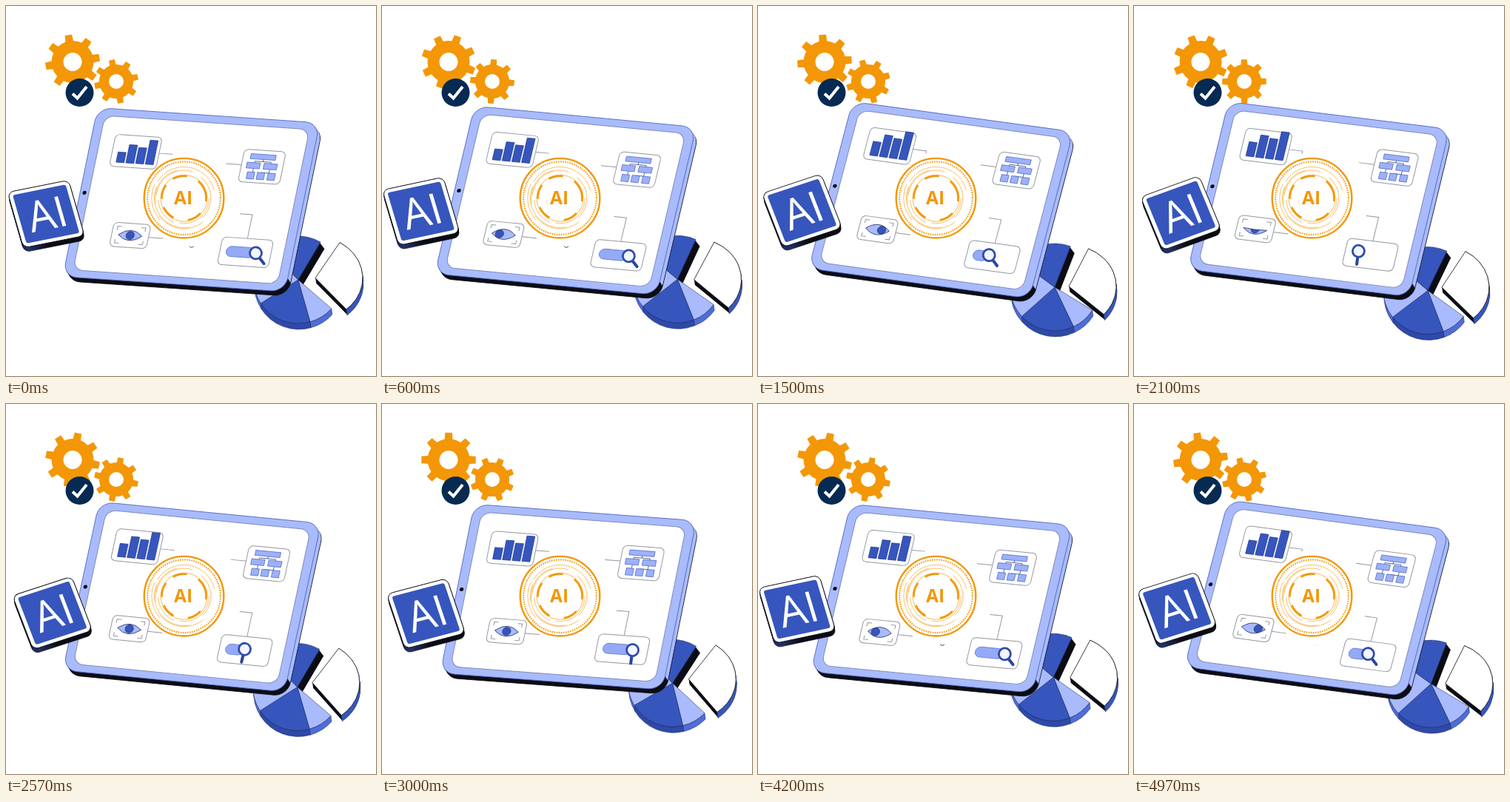
An HTML page with a canvas for the animation above (5010 ms loop, 500 by 500 pixels).

```html
<!DOCTYPE html>
<html lang="en">
<head>
<meta charset="utf-8">
<title>AI tablet</title>
<style>
  html, body { margin: 0; width: 100%; height: 100%; overflow: hidden; background: #fff; }
  canvas { display: block; width: 500px; height: 500px; }
</style>
</head>
<body>
<canvas id="stage"></canvas>
<script>
const canvas = document.getElementById('stage');
const ctx = canvas.getContext('2d');
const ratio = window.devicePixelRatio || 1;
canvas.width = canvas.height = 500 * ratio;

const LOOP = 5010, STEP = 100 / 3, SWAY = 3600;
const RAD = Math.PI / 180, TURN = 2 * Math.PI;
const BLUE = '#3656bd', LIGHT = '#a9bbfc', INK = '#0c0d14', EDGE = '#26346f';
const ORANGE = '#f39707', NAVY = '#062a52', GRAY = '#9498a3';

let now = 0;

// Every floating part swings around a mean and is highest at its peak time.
const wave = (mean, swing, peak) => mean + swing * Math.cos((now - peak) / SWAY * TURN);
const clamp = v => Math.max(0, Math.min(1, v));
const smooth = (from, to, t) => {
  const s = clamp((t - from) / (to - from));
  return s * s * (3 - 2 * s);
};
const bump = (t, mid, width, power) => Math.exp(-(((t - mid) / width) ** power));

// Matrix for a plane whose top edge dips by `dip` and whose side leans by `lean` degrees.
const plane = (dip, lean) =>
  [Math.cos(dip * RAD), Math.sin(dip * RAD), -Math.sin(lean * RAD), Math.cos(lean * RAD)];

function within(x, y, basis, draw) {
  ctx.save();
  ctx.transform(...basis, x, y);
  draw();
  ctx.restore();
}

function paint(fill, stroke, width = 1) {
  if (fill) { ctx.fillStyle = fill; ctx.fill(); }
  if (stroke) { ctx.strokeStyle = stroke; ctx.lineWidth = width; ctx.stroke(); }
}

function box(x, y, w, h, r, fill, stroke, width) {
  ctx.beginPath();
  ctx.roundRect(x, y, w, h, r);
  paint(fill, stroke, width);
}

function disc(x, y, r, fill, stroke, width) {
  ctx.beginPath();
  ctx.arc(x, y, r, 0, TURN);
  paint(fill, stroke, width);
}

function line(points, color, width = 1) {
  ctx.beginPath();
  points.forEach(([x, y]) => ctx.lineTo(x, y));
  paint(null, color, width);
}

function label(text, x, y, size, weight, color) {
  ctx.font = `${weight} ${size}px "Open Sans", "Noto Sans", sans-serif`;
  ctx.textAlign = 'center';
  ctx.fillStyle = color;
  ctx.fillText(text, x, y);
}

// Stacks copies from the bottom up to give a shape some depth.
function thick(depth, dx, draw) {
  for (let k = depth; k > 0; k--) {
    ctx.save();
    ctx.translate(dx * k / depth, k);
    draw(k === depth);
    ctx.restore();
  }
}

function gear(x, y, size, turn, hole) {
  const teeth = 8;
  ctx.beginPath();
  for (let i = 0; i < teeth; i++) {
    const mid = turn * RAD + i * TURN / teeth;
    [[0.77, -0.19], [1, -0.13], [1, 0.13], [0.77, 0.19]].forEach(([r, a]) =>
      ctx.lineTo(x + size * r * Math.cos(mid + a), y + size * r * Math.sin(mid + a)));
    ctx.arc(x, y, size * 0.77, mid + 0.19, mid + TURN / teeth - 0.19);
  }
  ctx.closePath();
  paint(ORANGE);
  disc(x, y, hole, '#fff');
}

function gears() {
  const spin = 135 * now / LOOP;
  gear(90, 75.5, 37, -9 - spin, 12.5);
  gear(149, 102, 30, spin - 12, 10);
  disc(99.5, 117, 19, NAVY);
  line([[90, 118.5], [96.5, 124.5], [109, 109]], '#fff', 4);
}

function sector(x, y, rx, ry, from, to) {
  ctx.beginPath();
  ctx.moveTo(x, y);
  ctx.ellipse(x, y, rx, ry, 0, from * RAD, to * RAD);
  ctx.closePath();
}

function rim(x, y, rx, ry, from, to, depth, fill) {
  ctx.beginPath();
  ctx.ellipse(x, y, rx, ry, 0, from * RAD, to * RAD);
  ctx.ellipse(x + 1, y + depth, rx, ry, 0, to * RAD, from * RAD, true);
  ctx.closePath();
  paint(fill, EDGE, 0.6);
}

function pie() {
  const x = wave(397, 4.5, 1200), y = wave(376.5, 8, 2150), turn = wave(-2.5, 6, 3100);
  const cuts = [40, 73, 146, 225, 299].map(a => a + turn);
  thick(8, 6, () => { sector(x, y, 59, 58, cuts[3], cuts[4]); paint(INK); });
  thick(8, 1, () => { sector(x, y, 59, 58, cuts[0], cuts[3]); paint(INK); });
  for (let i = 0; i < 3; i++) {
    rim(x, y, 60, 59, cuts[i], Math.min(cuts[i + 1], 185), 8, i === 1 ? '#2e49a8' : '#4f6dd6');
  }
  for (let i = 0; i < 4; i++) {
    sector(x, y, 60, 59, cuts[i], cuts[i + 1]);
    paint(i % 2 ? BLUE : LIGHT, EDGE, 0.6);
  }
}

function wedge() {
  const x = wave(418, 4.2, 900), y = wave(374, 6.5, 1900);
  const from = wave(-61, 6, 2900), to = from + 108;
  thick(7, 1, () => { sector(x, y, 64, 56, from, to); paint(INK); });
  rim(x, y, 64, 56, from, to, 8, BLUE);
  sector(x, y, 64, 56, from, to);
  paint('#fff', INK, 0.8);
}

function tablet(basis) {
  const x = wave(135.5, 1.8, 1800), y = wave(144, 4, 0);
  const shell = (fill, stroke) => box(-12, -10, 301, 233, 19, fill, stroke, 0.8);
  const side = ctx.createLinearGradient(0, 0, 0, 213);
  side.addColorStop(0, LIGHT);
  side.addColorStop(0.955, LIGHT);
  side.addColorStop(0.96, INK);
  thick(6, 4, lowest => within(x, y, basis, () => shell(side, lowest && INK)));
  within(x, y, basis, () => {
    shell(LIGHT, '#4a5fb5');
    box(0, 0, 277, 213, 13, '#fff', '#7f8cb8', 1);
    disc(-6, 107, 2.6, INK);
  });
}

function card(w, h) {
  box(-w / 2, -h / 2, w, h, 6, '#fff', GRAY, 1);
}

function chart(basis) {
  const tick = Math.max(0, wave(0, 4.2, 1800)), grow = wave(0, 3, 1900);
  within(wave(176.9, 1.5, 1800), wave(193, 4, -100), basis, () => {
    card(63, 44);
    line([[32, 0], [50, 0], [50, tick]], GRAY);
    [17, 28, 25, 36].forEach((h, i) =>
      box(-23.5 + i * 13.2, 16 - h - grow, 10.8, h + grow, 0, BLUE, '#22398f', 0.7));
  });
}

function flow(basis) {
  within(wave(348.5, 4, 2300), wave(219, 4, 1150), basis, () => {
    card(56, 45);
    line([[-28, -1], [-49, -1]], GRAY);
    line([[0, -12], [0, -7], [-11, -7], [-11, 13]], EDGE, 0.7);
    line([[0, -7], [11, -7], [11, 10], [15, 10], [15, 15]], EDGE, 0.7);
    line([[11, 8], [0, 8], [0, 13]], EDGE, 0.7);
    const part = (x, y, w, h) => box(x, y, w, h, 0, '#9db1fa', '#4964bd', 0.7);
    part(-18, -17, 34, 7);
    [-21, 2].forEach(x => part(x, -5, 18, 8));
    [-18, -4.5, 10].forEach(x => part(x, 8, 10, 9.5));
  });
}

function eye(basis) {
  const t = now % SWAY;
  const look = t < SWAY / 2 ? -6.5 * Math.sin(t / SWAY * 2 * TURN) : 0;
  const lid = 1 - 1.1 * bump(t, 2100, 280, 2);
  const almond = () => {
    ctx.beginPath();
    ctx.moveTo(-16, 0);
    ctx.quadraticCurveTo(0, -14 * lid, 16, 0);
    ctx.quadraticCurveTo(0, 14, -16, 0);
  };
  within(wave(165, 3.6, 3200), wave(305.6, 4.5, 100), basis, () => {
    card(50, 33);
    line([[25, 1], [45, 1]], GRAY);
    [-1, 1].forEach(sx => [-1, 1].forEach(sy =>
      line([[sx * 13, sy * 11.5], [sx * 19, sy * 11.5], [sx * 19, sy * 6.5]], GRAY)));
    ctx.save();
    almond();
    paint(LIGHT);
    ctx.clip();
    disc(look, 0, 5.5, BLUE, EDGE, 0.8);
    ctx.restore();
    almond();
    paint(null, EDGE, 0.8);
  });
}

function search(basis) {
  const t = now % SWAY;
  const x = wave(320.5, 4.2, 3150), y = wave(335.5, 4, 1300);
  const slide = smooth(700, 2100, t) - smooth(2100, 3000, t);
  const lx = 14 - 30 * slide, ly = 1 - 6 * slide;
  const tilt = (52 + 52 * bump(t, 2550, 750, 4)) * RAD;
  within(x, y, basis, () => {
    card(69, 38);
    line([[-1, -19], [-1, -52], [-18, -52]], GRAY);
    if (lx > -14) box(-26, -7, lx + 24, 14, 7, '#94aaf6', '#5f79cf', 0.8);
  });
  within(x + lx, y + ly, [Math.cos(tilt), Math.sin(tilt), -Math.sin(tilt), Math.cos(tilt)], () => {
    ctx.lineCap = 'round';
    line([[9, 0], [18, 0]], '#2b459f', 4);
    ctx.lineCap = 'butt';
    disc(0, 0, 8, '#f3f6ff', '#2f4bab', 2.8);
  });
}

function mark() {
  ctx.globalAlpha = clamp(wave(0.2, 0.9, 400));
  within(wave(249, 2, 3300), 325.5, [1, 0, 0, 1], () =>
    line([[-3, -0.8], [0, 1], [3, -0.8]], '#777c88', 1.2));
  ctx.globalAlpha = 1;
}

function badge() {
  let seed = 11;
  const random = () => (seed = seed * 16807 % 2147483647) / 2147483647;
  const arc = (r, from, sweep, width) => {
    ctx.beginPath();
    ctx.arc(0, 0, r, from * RAD, (from + sweep) * RAD);
    paint(null, ORANGE, width);
  };
  within(240.5, 259.7, [1, 0, 0, 1], () => {
    disc(0, 0, 55, '#fff');
    arc(53.8, 0, 360, 2.4);
    ctx.setLineDash([1.6, 1.5]);
    arc(49.3, 0, 360, 2);
    ctx.setLineDash([]);
    for (let r = 34; r < 44; r += 1.2) arc(r, random() * 360, 60 + random() * 90, 0.6);
    arc(31.5, 0, 360, 0.7);
    [-50, 42, 118, 178, 240].forEach((from, i) => arc(30, from, i ? 38 : 58, 2.6));
    label('AI', -1, 8.5, 24.5, 700, ORANGE);
  });
}

function tile() {
  const x = wave(58, 5.5, 2250), y = wave(279.5, 3.7, 2950), turn = wave(15.5, 4.5, 2000);
  const basis = plane(-turn, -(7.5 + 0.75 * turn));
  const side = ctx.createLinearGradient(-42, 0, 42, 0);
  side.addColorStop(0.12, '#3f5cc6');
  side.addColorStop(0.4, INK);
  const face = (fill, width) => box(-42, -39, 84, 78, 8, fill, INK, width);
  thick(6, 1, () => within(x, y, basis, () => face(side, 0.6)));
  within(x, y, basis, () => {
    face('#fff', 0.9);
    box(-36.5, -34, 73, 68, 3, BLUE);
    label('AI', 1, 21, 58, 400, '#fff');
  });
}

function draw() {
  ctx.setTransform(ratio, 0, 0, ratio, 0, 0);
  ctx.fillStyle = '#fff';
  ctx.fillRect(0, 0, 500, 500);
  const basis = plane(wave(5.8, 2, 1600), wave(13, 1.75, 1400));
  [pie, wedge, gears].forEach(part => part());
  [tablet, chart, flow, eye, search].forEach(part => part(basis));
  [mark, badge, tile].forEach(part => part());
}

const start = performance.now();
function frame() {
  const t = (performance.now() - start) % LOOP;
  now = Math.floor((t + 3.4) / STEP) * STEP;
  draw();
  requestAnimationFrame(frame);
}
frame();
</script>
</body>
</html>
```
